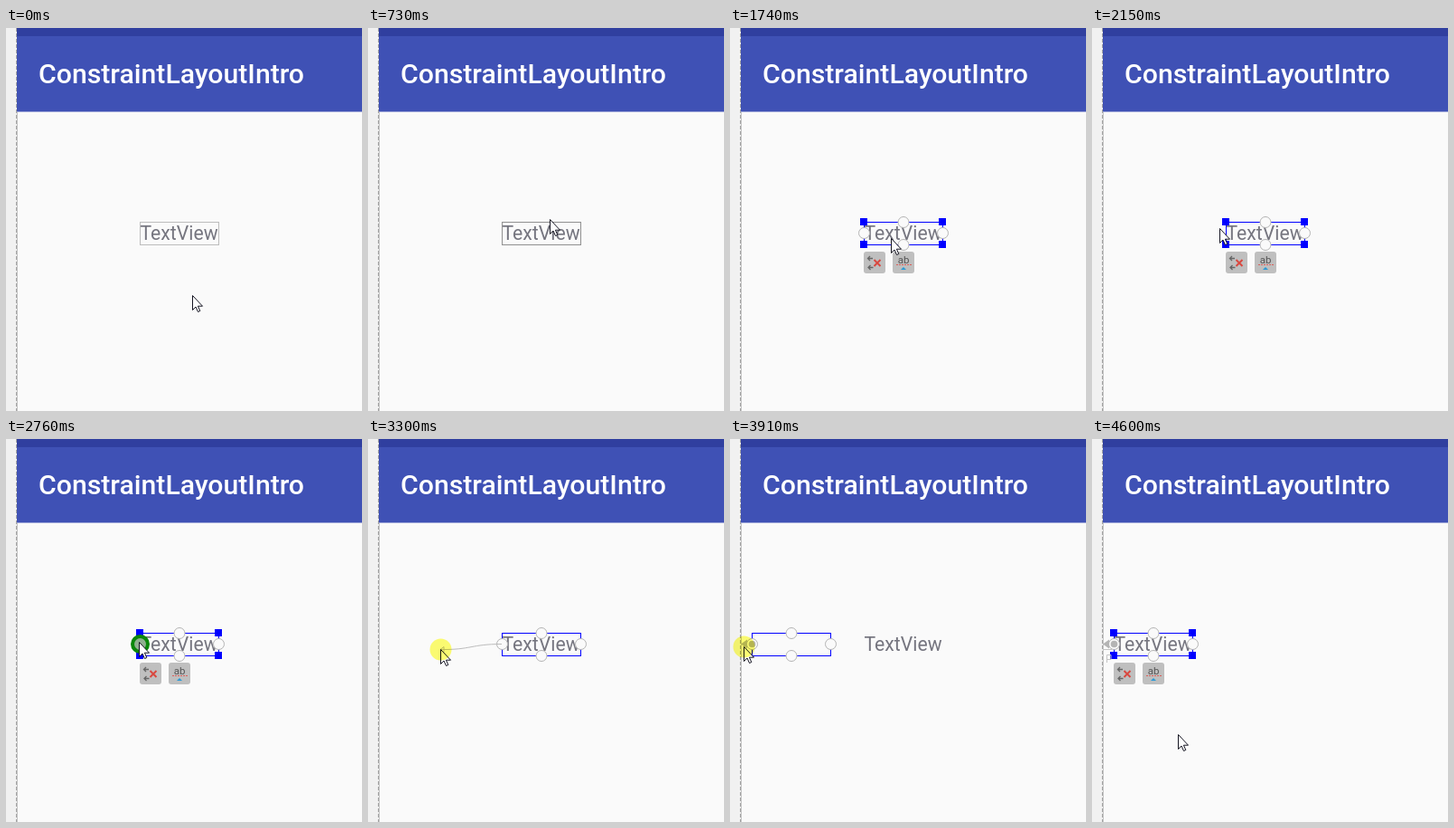
An HTML page that plays this animation: 394 px wide and 423 px high, repeating every 6330 ms.

```html
<!DOCTYPE html>
<html lang="en">
<head>
<meta charset="utf-8">
<title>Layout editor</title>
<style>
  html, body { margin: 0; width: 100%; height: 100%; overflow: hidden; background: #fafafa; }
  svg { display: block; }
  text { font-family: Roboto, sans-serif; }
  #halo { mix-blend-mode: multiply; }
</style>
</head>
<body>
<svg width="394" height="423" viewBox="0 0 394 423">
  <defs>
    <circle id="dot" r="6" fill="#fafafa" stroke="#b4b4b4"/>
    <rect id="tile" y="247" width="24" height="24" rx="3" fill="#bfbfbf"/>
    <path id="arrow" d="M5.500 0H0M2.500-2.500 0 0l2.500 2.500" fill="none" stroke="#666" stroke-width="1.300"/>
  </defs>

  <rect width="394" height="423" fill="#fafafa"/>
  <rect width="12" height="423" fill="#f1f1f1"/>
  <rect x="12" width="382" height="92.500" fill="#3f51b5"/>
  <rect x="12" width="382" height="9" fill="#303f9f"/>
  <path d="M12.500 93V423" stroke="#c4c4c4"/>
  <path d="M11.500 0V423" stroke="#a4a4a4" stroke-dasharray="4 2"/>
  <text x="36" y="61" font-size="30.200" font-weight="500" fill="#fff">ConstraintLayoutIntro</text>

  <text id="label" x="148.500" y="234" font-size="21.200" fill="#75757f">TextView</text>

  <g id="widget">
    <rect id="frame" x="148.500" y="214.500" width="87" height="25" fill="none"/>
    <path id="corners" d="M148 214h0m87 0h0m0 25h0m-87 0h0" stroke="#00f" stroke-width="8" stroke-linecap="square"/>
    <g id="anchors">
      <use href="#dot" x="192" y="214.500"/>
      <use href="#dot" x="192" y="239.500"/>
      <use href="#dot" x="235.500" y="226.500"/>
      <use href="#dot" id="left" x="148.500" y="226.500"/>
    </g>
    <circle id="ring" cx="148.500" cy="226.500" r="8.500" fill="#8fb08f" stroke="#0a870a" stroke-width="4"/>
    <g id="buttons">
      <use href="#tile" x="148"/>
      <use href="#arrow" x="152.500" y="254.500"/>
      <use href="#arrow" x="153" y="264.500"/>
      <path d="M159.500 256l7 7m0-7l-7 7" stroke="#d9483f" stroke-width="2"/>
      <use href="#tile" x="180"/>
      <text x="192" y="259.500" font-size="11.500" text-anchor="middle" fill="#555">ab</text>
      <path d="M184 261.500h17" stroke="#d9605a" stroke-dasharray="2 1"/>
      <path d="M189 267l3-3 3 3z" fill="#2c9ad6"/>
    </g>
  </g>

  <g id="pin" fill="#b4b4b4">
    <path d="M12 226.500l7-5v10z"/>
    <circle cx="24.500" cy="226.500" r="3.800"/>
  </g>
  <path id="margin" d="M13 232.500h9M16.500 247v-8.500h4.500v5h-4.500" fill="none" stroke="#c4c4c4"/>
  <path id="link" fill="none" stroke="#bcbcbc"/>
  <path id="cursor" d="M.5.5v16l3.500-3.500 2.500 5.500 2.300-1-2.400-5.300h5.100z" fill="#fff" stroke="#151522"/>
  <circle id="halo" r="12" fill="#ffff73"/>
</svg>
<script>
const LOOP = 6330, SHIFT = -124;
const $ = id => document.getElementById(id);
const show = (id, on) => $(id).style.display = on ? "" : "none";
const moveTo = (id, x, y) => $(id).setAttribute("transform", `translate(${x} ${y})`);

// The pointer travels in steps between stops, bending down by sag
const moves = [
  { start: 420, end: 970, steps: 8, from: [206, 295], to: [198, 223], sag: -42 },
  { start: 1660, end: 2150, steps: 7, from: [198, 223], to: [141, 221], sag: 11 },
  { start: 2300, end: 2450, steps: 3, from: [141, 221], to: [147, 224], sag: 0 },
  { start: 3070, end: 3680, steps: 9, from: [147, 224], to: [15, 229], sag: 5.5 },
  { start: 4310, end: 4600, steps: 5, from: [15, 229], to: [95, 326], sag: 0 }
];

function pointer(t) {
  const { start, end, steps, from, to, sag } = moves.findLast(m => t >= m.start) || moves[0];
  const step = Math.floor((t - start) * (steps - 1) / (end - start) + 1.08);
  const p = Math.min(1, Math.max(0, step / steps)) ** .84;
  const mix = i => from[i] + (to[i] - from[i]) * p;
  return [Math.round(mix(0)), Math.round(mix(1) + sag * Math.sin(Math.PI * p))];
}

function draw(t) {
  const [x, y] = pointer(t);
  const selected = t >= 1200;
  const snapped = t >= 3680;
  const dropped = t >= 3990;
  const dragging = t >= 3070 && !dropped;
  const hover = t >= 1900 && t < 3070;

  moveTo("cursor", x, y);
  moveTo("halo", x + .5, y + .5);
  moveTo("widget", snapped ? SHIFT : 0, 0);
  moveTo("label", dropped ? SHIFT : 0, 0);
  $("frame").setAttribute("stroke", selected ? "#00f" : y < 240 ? "#909090" : "#bcbcbc");

  show("anchors", selected);
  show("left", !hover);
  show("ring", hover && (t - 1840) % 460 < 310);
  show("corners", selected && !dragging);
  show("buttons", selected && !dragging);
  show("halo", t >= 2840 && !dropped);
  show("pin", snapped);
  show("margin", dropped);
  show("link", dragging && !snapped);

  const mid = (148 + x) / 2;
  $("link").setAttribute("d", `M148 226.5C${mid} 226.5 ${mid} ${y + 1} ${x} ${y + .5}l4-3v6l-4-3`);
}

function tick() {
  draw(performance.now() % LOOP);
  requestAnimationFrame(tick);
}
tick();
</script>
</body>
</html>
```
